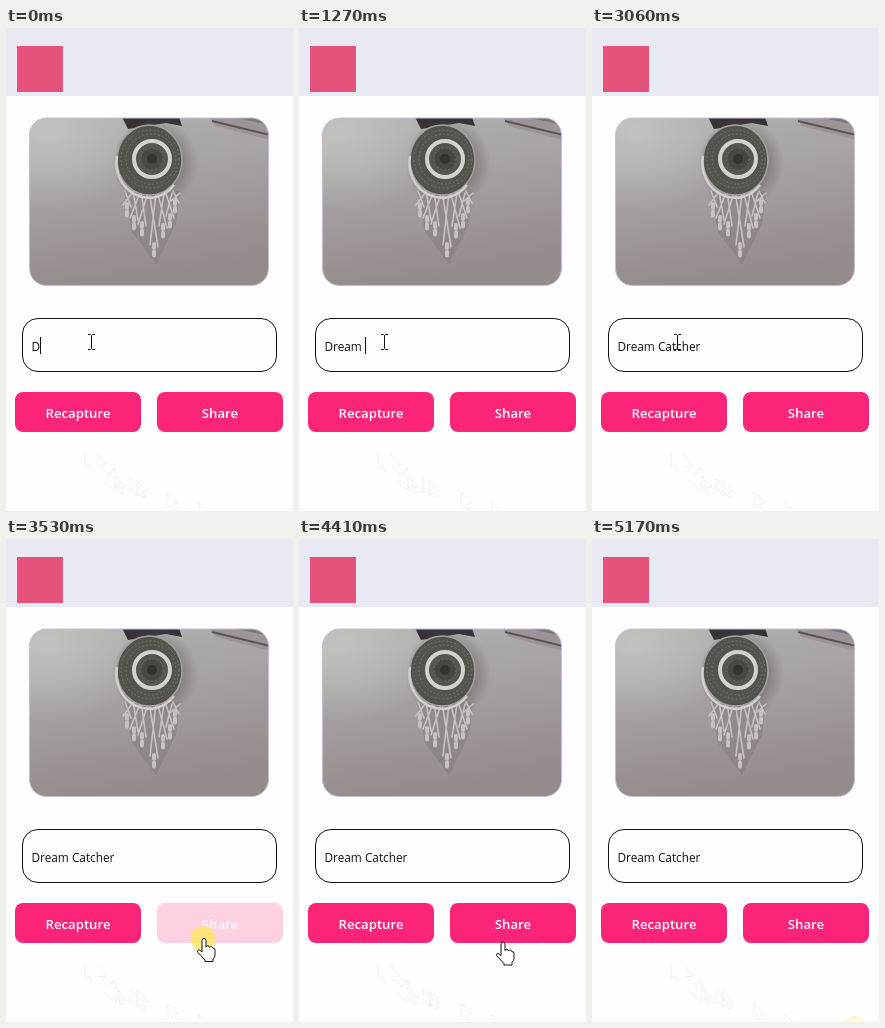
Write an HTML page that moves like this. It is 287 by 483 pixels and loops after 5370 ms.

```html
<!DOCTYPE html>
<html lang="en">
<head>
<meta charset="utf-8">
<style>
  html, body { margin: 0; width: 100%; height: 100%; overflow: hidden; background: #fefefe; }
  svg { display: block; }
  text { font: 11.8px "Open Sans", sans-serif; fill: #111; }
  .button rect { fill: #fd2577; }
  .button text { font-size: 13.2px; font-weight: 600; fill: #fff; text-anchor: middle; }
  #pointer { fill: #fff; stroke: #111; stroke-linejoin: round; }
  #beam { fill: none; }
</style>
</head>
<body>
<svg width="287" height="483" viewBox="0 0 287 483">
  <defs>
    <linearGradient id="wall" x2="0.25" y2="1">
      <stop offset="0" stop-color="#b3b2b1"/>
      <stop offset="0.5" stop-color="#a59fa1"/>
      <stop offset="1" stop-color="#938b8c"/>
    </linearGradient>
    <radialGradient id="glow" cx="0.08" cy="0.1" r="0.45">
      <stop offset="0" stop-color="#c6ccc6" stop-opacity="0.7"/>
      <stop offset="1" stop-color="#c6ccc6" stop-opacity="0"/>
    </radialGradient>
    <radialGradient id="shade">
      <stop offset="0.6" stop-color="#625b5d" stop-opacity="0.5"/>
      <stop offset="1" stop-color="#625b5d" stop-opacity="0"/>
    </radialGradient>
    <clipPath id="frame"><rect x="23.5" y="90" width="239" height="167.5" rx="17"/></clipPath>
    <path id="arrow-shape" d="M0 0V15L3.5 12 6 18 8.500 17 6 11H10.500Z"/>
  </defs>

  <rect width="287" height="68" fill="#e8e9f3"/>
  <rect x="11" y="18" width="46" height="46" fill="#e5527c"/>

  <g clip-path="url(#frame)">
    <rect x="23" y="89" width="241" height="170" fill="url(#wall)"/>
    <rect x="23" y="89" width="241" height="170" fill="url(#glow)"/>
    <path d="M116 89H173L176 98 160 95 122 101Z" fill="#383235"/>
    <path d="M203 89H264V112L210 98Z" fill="#9c9598"/>
    <path d="M206 93 264 107" stroke="#5a5356" stroke-width="2"/>
    <path d="M226 89H264V97Z" fill="#7d7679"/>
    <ellipse cx="149" cy="135" rx="43" ry="45" fill="url(#shade)"/>
    <path d="M118 163H174L170 196 150 236 126 204Z" fill="#7f7879" opacity="0.45"/>
    <g id="tassels" fill="none" stroke="#c6c1c2" stroke-linecap="round"></g>
    <ellipse cx="143.5" cy="132" rx="32.5" ry="35" fill="#52534c" stroke="#a5a0a0" stroke-width="1.5"/>
    <path d="M111 128A32.500 35 0 0 0 168 157" fill="none" stroke="#d3cfcf" stroke-width="2.5"/>
    <g fill="none" stroke="#76766e" stroke-dasharray="2 2">
      <circle cx="144" cy="131" r="29"/>
      <circle cx="145" cy="131" r="25"/>
    </g>
    <circle cx="146" cy="131" r="18" fill="#55564f" stroke="#d4d1d1" stroke-width="4"/>
    <circle cx="146" cy="131" r="11" fill="#484842" stroke="#6d6d66" stroke-dasharray="2 2"/>
    <circle cx="146" cy="131" r="5" fill="#34342f"/>
  </g>
  <rect x="23.5" y="90" width="239" height="167.5" rx="17" fill="none" stroke="#c6bddd"/>

  <rect x="16.5" y="290.5" width="254" height="53" rx="15.5" fill="#fefefe" stroke="#111"/>
  <text id="caption" x="25.5" y="323"></text>
  <rect id="caret" y="309" width="1" height="17" fill="#111"/>

  <g class="button">
    <rect x="9" y="364" width="126" height="40" rx="8"/>
    <text x="72" y="390">Recapture</text>
  </g>
  <g class="button" id="share">
    <rect x="151" y="364" width="126" height="40" rx="8"/>
    <text x="214" y="390">Share</text>
  </g>

  <g fill="none" stroke="#eef3f2">
    <path d="M79 424V440L83 437 86 444M91 425l10 12-8 1M96 440l7 8 5-8 6 18-8 3-9-9"/>
    <use href="#arrow-shape" x="109" y="448"/>
    <use href="#arrow-shape" x="124" y="450"/>
    <use href="#arrow-shape" x="131" y="452"/>
    <use href="#arrow-shape" x="162" y="464"/>
    <use href="#arrow-shape" x="193" y="475"/>
  </g>

  <circle id="click" r="12.2" fill="#fce768"/>
  <g id="pointer">
    <path id="beam" d="M-3.500-7.500H-1L0-6.500 1-7.500H3.500M0-6.500V6.500M-3.500 7.500H-1L0 6.500 1 7.500H3.500"/>
    <path id="hand" d="M-2 13V1.500a2 2 0 0 1 4 0V8a1.800 1.800 0 0 1 3.500.5 1.800 1.800 0 0 1 3.400.8 1.600 1.600 0 0 1 2.100 1.500V16q0 2-2 4v2.500H1V21L-6 13.500q-1.500-2 .3-2.600 1.400-.4 3.700 2.100z"/>
    <use id="arrow" href="#arrow-shape"/>
  </g>
</svg>
<script>
const LOOP = 5370;
const CAPTION = 'Dream\u00a0Catcher';
const KEY_TIMES = [0, 130, 330, 460, 1070, 1270, 1600, 1800, 1870, 2070, 2270, 2400, 2530];
const BLINK = 530;
const START = [85.5, 314], ON_SHARE = [198, 400], LEAVING = [204, 403.5], OUTSIDE = [262, 489];

const $ = id => document.getElementById(id);
const clamp = u => Math.min(1, Math.max(0, u));
const ease = u => (u = clamp(u)) < .5 ? 2 * u * u : 1 - 2 * (1 - u) ** 2;
const mix = (a, b, u) => a.map((v, i) => v + (b[i] - v) * u);
const hold = (t, from, step) => from + Math.floor((t - from) / step) * step;

function drawTassels() {
  const tips = [[121, 193], [128, 206], [136, 212], [148, 233], [157, 214], [164, 204], [169, 189]];
  let net = '', ends = '';
  tips.forEach(([x, y], i) => {
    const top = 119 + i * 8;
    net += `M${top} 163L${x + 4} ${y - 14}M${top + 7} 165L${x - 4} ${y - 16}`;
    ends += `M${x} ${y - 17}V${y - 2}`;
  });
  $('tassels').innerHTML = `<path d="${net}" stroke-width="1.6"/>` +
    `<path d="${ends}" stroke-width="4" stroke-dasharray="4 3.5"/>`;
}

function drawTyping(t) {
  const count = KEY_TIMES.filter(k => k <= t).length;
  $('caption').textContent = CAPTION.slice(0, count);
  $('caret').setAttribute('x', Math.round(25.5 + $('caption').getComputedTextLength()));
  $('caret').style.opacity = t - KEY_TIMES[count - 1] < BLINK ? 1 : 0;
}

function drawPointer(t) {
  const [x, y] = t < 4410
    ? mix(START, ON_SHARE, clamp((hold(t, 3060, 66.6) - 3060) / 199))
    : mix(LEAVING, OUTSIDE, ease((hold(t, 4410, 70) - 4410) / 420));
  const kind = y < 344 ? 'beam' : y < 405 ? 'hand' : 'arrow';
  for (const id of ['beam', 'hand', 'arrow']) $(id).style.display = id === kind ? '' : 'none';
  $('pointer').setAttribute('transform', `translate(${x} ${y})`);
}

function drawClicks(t) {
  const tick = hold(t, 3460, 67.5);
  const press = ease((tick - 3400) / 127), release = ease((tick - 3662) / 250);
  $('share').style.opacity = 1 - .8 * press * (1 - release);

  const second = t >= 4900;
  const [x, y] = second ? OUTSIDE : [197, 399.5];
  $('click').setAttribute('transform', `translate(${x} ${y})`);
  $('click').style.opacity = second ? (t < 5170 ? .85 : .25)
    : t < 3460 || t >= 3800 ? 0 : t < 3730 ? .85 : .35;
}

function draw(now) {
  const t = now % LOOP;
  drawTyping(t);
  drawPointer(t);
  drawClicks(t);
}

drawTassels();
let begin;
function tick(now) {
  begin ??= now;
  draw(now - begin);
  requestAnimationFrame(tick);
}
draw(0);
requestAnimationFrame(tick);
</script>
</body>
</html>
```
